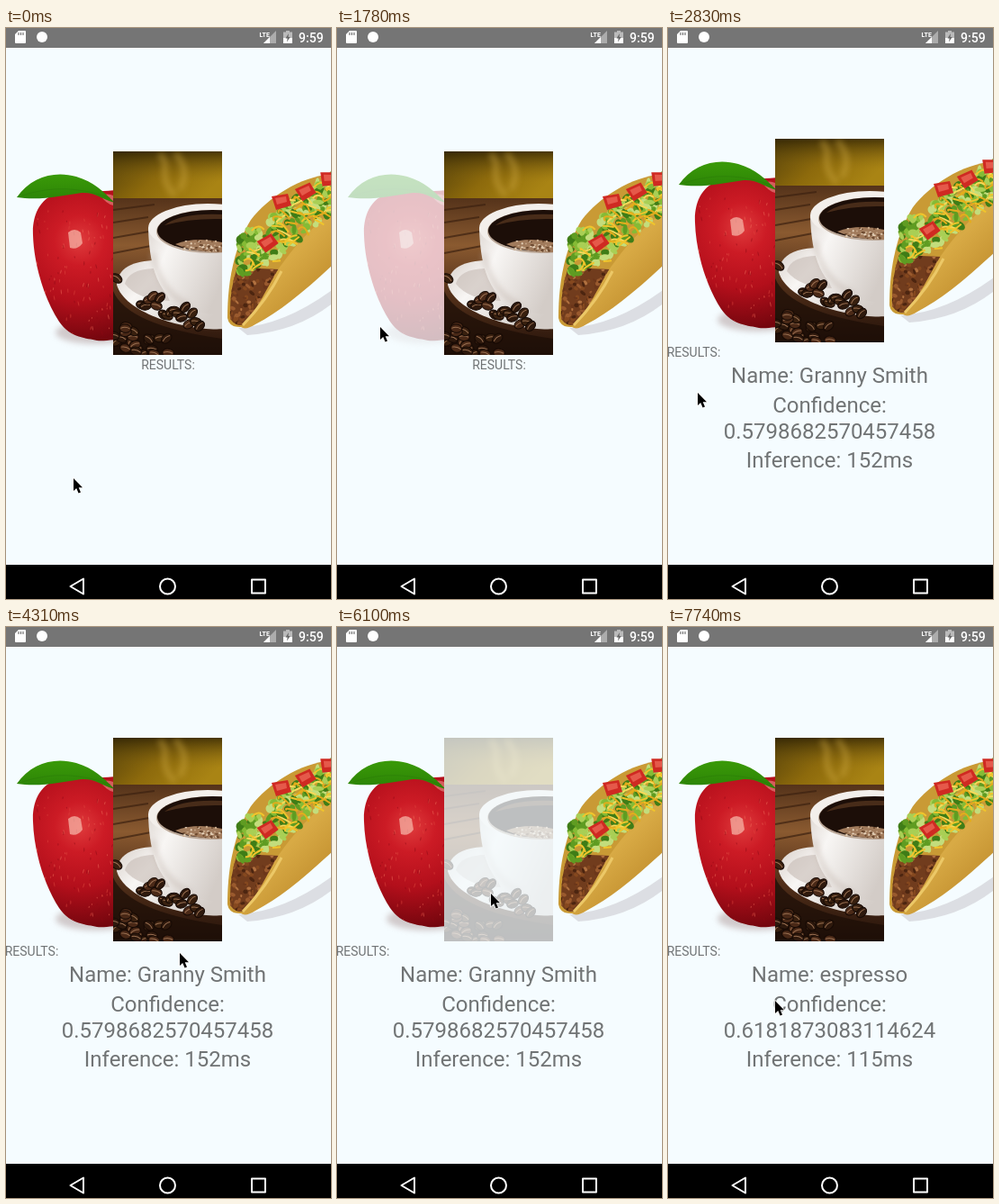
Write an HTML page that moves like this. It is 361 px wide and 634 px high and loops after 8 s.

```html
<!DOCTYPE html>
<html lang="en">
<head>
<meta charset="utf-8">
<title>Image classifier</title>
<style>
html, body { margin: 0; width: 100%; height: 100%; overflow: hidden; background: #f5fcff; }
svg { display: block; width: 361px; height: 634px; font-family: Roboto, sans-serif; }
.label { font-size: 14px; fill: #717475; text-anchor: middle; }
.result { font-size: 24px; fill: #717475; text-anchor: middle; }
</style>
</head>
<body>
<svg viewBox="0 0 361 634">
  <defs>
    <radialGradient id="red" gradientUnits="userSpaceOnUse" cx="82" cy="236" r="112">
      <stop offset="0" stop-color="#df3b3c"/><stop offset=".25" stop-color="#cc1b25"/>
      <stop offset=".6" stop-color="#b30f1b"/><stop offset="1" stop-color="#75060e"/>
    </radialGradient>
    <linearGradient id="leaf" x2="0" y2="1"><stop stop-color="#3a9a08"/><stop offset="1" stop-color="#2b8206"/></linearGradient>
    <linearGradient id="wall" x2="1" y2=".5">
      <stop stop-color="#54400a"/><stop offset=".5" stop-color="#8d6a0c"/><stop offset="1" stop-color="#a98414"/>
    </linearGradient>
    <linearGradient id="dusk" x2="0" y2="1"><stop stop-color="#2c2004" stop-opacity=".75"/><stop offset="1" stop-color="#8a6a10" stop-opacity="0"/></linearGradient>
    <linearGradient id="wood" x2="0" y2="1">
      <stop stop-color="#55331a"/><stop offset=".3" stop-color="#8a5a30"/><stop offset=".6" stop-color="#55311a"/><stop offset="1" stop-color="#24120a"/>
    </linearGradient>
    <linearGradient id="china" x2="1" y2=".6">
      <stop stop-color="#d8d0ca"/><stop offset=".35" stop-color="#f8f6f4"/><stop offset="1" stop-color="#d3ccc7"/>
    </linearGradient>
    <linearGradient id="shell" x2=".8" y2="1">
      <stop stop-color="#d9ab40"/><stop offset=".5" stop-color="#d8aa45"/><stop offset="1" stop-color="#b98425"/>
    </linearGradient>
    <filter id="soft" x="-40%" y="-40%" width="180%" height="180%"><feGaussianBlur stdDeviation="3"/></filter>
    <clipPath id="appleCell"><path d="M0 137H119V363H0Z"/></clipPath>
    <clipPath id="coffeeCell"><path d="M119 137H240V363H119Z"/></clipPath>
    <clipPath id="appleShape"><path id="appleBody" d="M124 179C108 184 84 177 62 182C38 187 29 207 30 230C31 262 42 300 59 326C72 345 90 344 101 347C108 348 116 346 124 346Z"/></clipPath>
    <clipPath id="meatShape"><path id="meatBody" d="M249 323Q248 290 257 266L304 268Q292 302 265 329Q255 332 249 323Z"/></clipPath>
  </defs>

  <rect width="361" height="634" fill="#f5fcff"/>

  <g id="pics">
    <g id="apple" clip-path="url(#appleCell)">
      <ellipse cx="100" cy="338" rx="45" ry="13" fill="#b9a9a9" opacity=".6" filter="url(#soft)"/>
      <use href="#appleBody" fill="url(#red)"/>
      <g id="specks" clip-path="url(#appleShape)"></g>
      <path d="M69 227q7-6 14 0l2 12q-6 8-14 5Z" fill="#f5b3a6" opacity=".75"/>
      <path d="M105 186q8-3 14 0v11q-8-2-14-11Z" fill="#e8918a" opacity=".6"/>
      <path d="M12 188C28 165 54 158 78 165C99 171 110 184 121 194C106 190 99 182 84 183C62 186 38 192 12 188Z" fill="url(#leaf)"/>
      <path d="M18 186Q66 170 116 189" fill="none" stroke="#2a7a08" opacity=".5"/>
    </g>

    <g id="coffee" clip-path="url(#coffeeCell)">
      <rect x="119" y="137" width="121" height="60" fill="url(#wall)"/>
      <rect x="119" y="137" width="121" height="34" fill="url(#dusk)"/>
      <path d="M170 140C185 152 166 165 188 186M188 139Q205 158 193 180" fill="none" stroke="#d3ad45" stroke-width="7" opacity=".4" filter="url(#soft)"/>
      <rect x="119" y="189" width="121" height="174" fill="url(#wood)"/>
      <path d="M119 202L165 196M119 216L158 210M119 233L159 226M119 250L161 242" stroke="#3c2110" stroke-width="2" opacity=".7"/>
      <path d="M119 292Q135 330 240 345V363H119Z" fill="#1c0d06" opacity=".7"/>
      <path d="M123 285C124 267 140 258 168 258L245 300V334C205 338 132 318 123 285Z" fill="url(#china)"/>
      <path d="M132 284Q136 268 164 267L182 303Q146 302 132 284Z" fill="#c9bfb8" opacity=".65"/>
      <path d="M158 222C159 265 169 292 190 306Q210 318 245 319V200Z" fill="url(#china)"/>
      <path d="M163 250Q170 294 205 309" fill="none" stroke="#b9aaa1" stroke-width="6" opacity=".4" filter="url(#soft)"/>
      <ellipse cx="224" cy="222" rx="66" ry="27" fill="#f3efeb"/>
      <ellipse cx="227" cy="226" rx="60" ry="24" fill="#b9a696"/>
      <ellipse cx="229" cy="225" rx="61" ry="23" fill="#1c0e08"/>
      <path d="M176 219Q194 205 240 207V212Q204 211 176 219Z" fill="#5c3a22" opacity=".7"/>
      <path d="M188 240Q211 231 240 238V249Q208 249 188 240Z" fill="#a17b5c"/>
      <g id="foam"></g>
      <g id="beans"></g>
    </g>

    <g id="taco">
      <path d="M258 333Q310 330 366 288V303Q325 337 268 341Z" fill="#d9dade" opacity=".85"/>
      <path d="M246 322C246 288 251 247 272 213C292 187 330 163 366 162V240L262 332Q248 333 246 322Z" fill="#c99a35"/>
      <use href="#meatBody" fill="#713c1d"/>
      <g id="meat" clip-path="url(#meatShape)"></g>
      <path d="M261 332C278 316 290 288 303 267C320 243 340 220 366 202V260C332 292 304 315 277 329Q266 336 261 332Z" fill="url(#shell)"/>
      <path d="M263 330Q290 302 306 270" fill="none" stroke="#ecc867" stroke-width="3"/>
      <g id="salad"></g>
    </g>
  </g>

  <text id="label" class="label">RESULTS:</text>
  <g id="result" class="result">
    <text id="name" x="179.5" y="394"></text>
    <text x="179.5" y="427">Confidence:</text>
    <text id="score" x="179.5" y="456"></text>
    <text id="speed" x="179.5" y="488"></text>
  </g>

  <rect width="361" height="22" fill="#757575"/>
  <g fill="#fff">
    <path d="M14 3H21Q22 3 22 4V16Q22 17 21 17H11Q10 17 10 16V7Z"/>
    <path d="M14 5v3M16.5 5v3M19 5v3" stroke="#757575" stroke-width="1.2"/>
    <circle cx="40" cy="10" r="6"/>
    <text x="281.5" y="10" font-size="7" font-weight="700" textLength="auto">LTE</text>
    <path d="M300 3V17H286Z" opacity=".4"/>
    <path d="M293 10V17H286Z"/>
    <path d="M311 3H315V4.5H318V17H308V4.5H311Z" opacity=".5"/>
    <path d="M308 11H318V17H308Z"/>
    <path d="M314 6L310.500 11.500H312.700L312 15.500L315.700 10H313.500Z" fill="#666"/>
    <text x="325" y="15.500" font-size="14" font-weight="500">9:59</text>
  </g>

  <rect y="596" width="361" height="38" fill="#000"/>
  <g fill="none" stroke="#fff" stroke-width="2" stroke-linejoin="round">
    <path d="M71.500 620L86 611.500V628.500Z"/>
    <circle cx="179.500" cy="620" r="8.500"/>
    <rect x="273" y="612.500" width="15" height="15"/>
  </g>

  <path id="cursor" d="M0 0V14L3.200 11L5.600 16.600L8 15.500L5.700 10.200H10Z" fill="#000" stroke="#fff" stroke-width="1.400" paint-order="stroke"/>
</svg>

<script>
const el = id => document.getElementById(id);
let seed = 7;
const rand = (lo, hi) => {
  seed = (seed * 16807) % 2147483647;
  return lo + (hi - lo) * seed / 2147483647;
};
const pick = list => list[Math.floor(rand(0, list.length))];
const many = (n, make) => Array.from({ length: n }, (_, i) => make(i)).join('');
const blob = (x, y, rx, ry, fill, turn = 0, extra = '') =>
  `<ellipse rx="${rx}" ry="${ry}" fill="${fill}" transform="translate(${x} ${y}) rotate(${turn})" ${extra}/>`;
const bean = (x, y) => {
  const turn = rand(-50, 50);
  return blob(x, y, 6.5, 4.6, pick(['#4a2917', '#38200f', '#2e190d']), turn, 'stroke="#160a05"') +
    `<path d="M-5 0Q0 -2.500 5 0" fill="none" stroke="#9a7052" transform="translate(${x} ${y}) rotate(${turn})"/>`;
};

el('specks').innerHTML = many(110, () =>
  blob(rand(32, 119), rand(192, 340), .6, rand(.8, 3), pick(['#ee6a58', '#e0483f', '#8b0914']), rand(-20, 20), 'opacity=".5"'));

el('foam').innerHTML = many(45, () =>
  blob(rand(196, 240), rand(236, 248), rand(.8, 2), rand(.7, 1.5), pick(['#e2cdb4', '#c7a98a', '#6d4a30'])));

el('beans').innerHTML =
  many(16, () => bean(rand(119, 182), rand(343, 363))) +
  many(7, () => bean(rand(119, 146), rand(331, 345))) +
  many(17, i => {
    const x = 151 + i * 4;
    return bean(x, 301 + (x - 151) * .37 + rand(-9, 9));
  }) + bean(123, 278);

el('meat').innerHTML = many(130, () =>
  blob(rand(248, 302), rand(265, 331), rand(1.2, 3.6), rand(1, 2.6), pick(['#9a5a2e', '#4c2510', '#b0703f', '#6b361a', '#85481f']), rand(0, 180)));

// Filling runs along a slanted band that narrows to the right.
const inBand = () => {
  const x = rand(259, 366), half = 31 - (x - 259) * .09;
  const lean = Math.max(0, 284 - x) * .7;
  return [x, 236 - (x - 290) * .74 - lean * .3 + rand(-1, 1) * (half - lean * .6)];
};
const tomato = (x, y, turn) =>
  `<g transform="translate(${x} ${y}) rotate(${turn})"><path d="M-11 -6L7 -9L11 4L-6 9Z" fill="#cf2a22"/><path d="M-7 -4L5 -6L6 0L-5 3Z" fill="#e5594a"/></g>`;
el('salad').innerHTML =
  many(190, () => {
    const [x, y] = inBand();
    return blob(x, y, rand(3, 6.500), rand(2, 4.500), pick(['#5f9c22', '#85bb36', '#a9cf55', '#3f7d17', '#c3dd7c']), rand(0, 180));
  }) +
  many(55, () => {
    const [x, y] = inBand();
    return `<path d="M${x} ${y}q${rand(-5, 9)} ${rand(-9, 3)} ${rand(8, 16)} ${rand(-10, 9)}" fill="none" stroke="${pick(['#f0c52c', '#e3ad1d', '#f5d95a'])}" stroke-width="2"/>`;
  }) +
  tomato(291, 239, -20) + tomato(306, 193, 0) + tomato(333, 182, -15) + tomato(359, 168, 10);

// Each row is [start in ms, values...], held until the next row.
const cursorSteps = [
  [0, 75, 500], [600, 82, 492], [750, 92, 463], [900, 86, 425], [1040, 70, 386], [1180, 55, 350], [1330, 48, 332],
  [2380, 46, 342], [2530, 42, 362], [2680, 37, 387], [2830, 33, 405], [2980, 28, 425],
  [3130, 24, 446], [3280, 40, 470], [3430, 108, 481], [3580, 198, 477], [3730, 249, 440], [3880, 240, 394], [4030, 211, 360], [4170, 190, 361],
  [4310, 193, 362], [4760, 190, 349], [4910, 179, 316], [5050, 171, 296],
  [7150, 168, 305], [7300, 156, 334], [7450, 140, 370], [7590, 126, 401], [7740, 119, 415]
];
const appleFade = [[0, 1], [1780, .25], [2080, .38], [2230, .85], [2380, 1]];
const coffeeFade = [[0, 1], [6100, .25], [6400, .45], [6550, .88], [6700, 1]];
const results = [
  [0, '', '', ''],
  [2080, 'Granny Smith', '0.5798682570457458', '152ms'],
  [6400, 'espresso', '0.6181873083114624', '115ms']
];
const at = (rows, t) => rows.findLast(row => row[0] <= t).slice(1);

function draw(now) {
  const t = now % 8000, [x, y] = at(cursorSteps, t), [name, score, speed] = at(results, t);
  el('cursor').setAttribute('transform', `translate(${x} ${y})`);
  el('apple').setAttribute('opacity', at(appleFade, t)[0]);
  el('coffee').setAttribute('opacity', at(coffeeFade, t)[0]);
  el('pics').setAttribute('transform', `translate(0 ${name ? -14 : 0})`);
  el('label').setAttribute('x', name ? 28.5 : 180);
  el('label').setAttribute('y', name ? 365 : 379);
  el('result').setAttribute('visibility', name ? 'visible' : 'hidden');
  el('name').textContent = 'Name: ' + name;
  el('score').textContent = score;
  el('speed').textContent = 'Inference: ' + speed;
  requestAnimationFrame(() => draw(performance.now() - start));
}
const start = performance.now();
draw(0);
</script>
</body>
</html>
```
